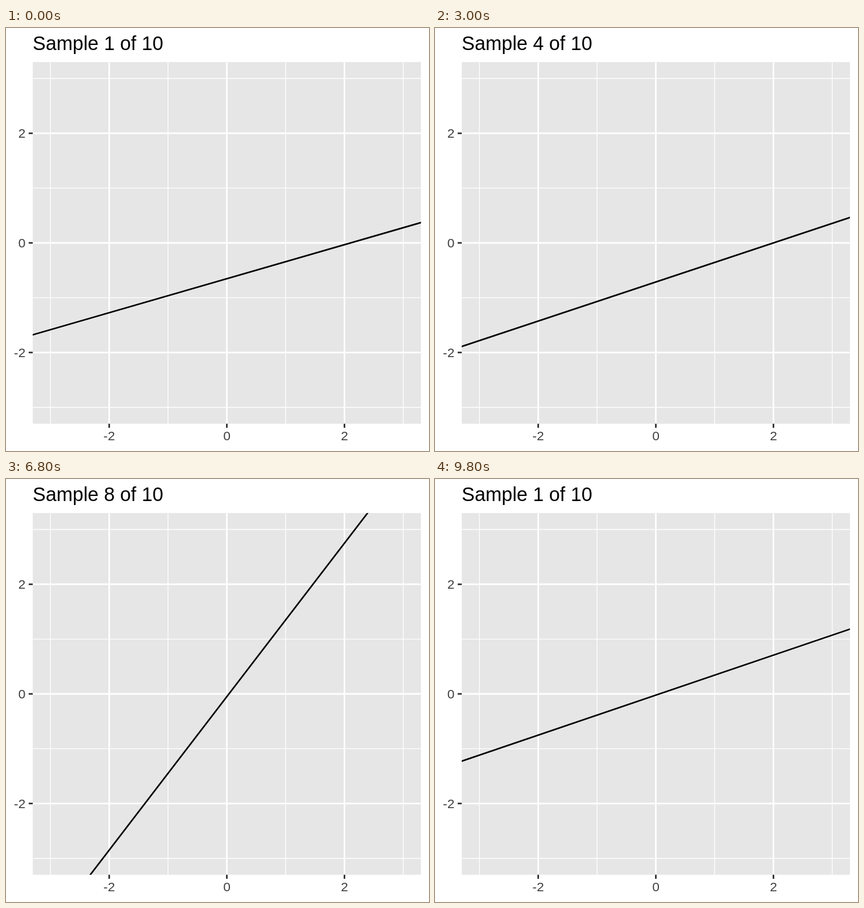
Recreate the animation shown at these times as an HTML page with a canvas. Size 748 by 748 pixels, loop 10 s.

```html
<!DOCTYPE html>
<html lang="en">
<head>
<meta charset="utf-8">
<title>Sampled lines</title>
<style>
  html, body { margin: 0; width: 100%; height: 100%; overflow: hidden; background: #fff; }
  canvas { display: block; width: 748px; height: 748px; }
</style>
</head>
<body>
<canvas id="plot" width="748" height="748"></canvas>
<script>
const ctx = document.getElementById('plot').getContext('2d');
const SIZE = 748, LIMIT = 3.3;
const PT = 2.6; // pixels per typographic point
const panel = { left: 47.3, top: 60.2, right: 733.7, bottom: 699.8 };
const STEP = 1000, TITLE_LEAD = 200;

// [intercept, slope] of each sample
const samples = [
  [-0.653, 0.3103], [-0.756, 1.427], [0.8, 0.642], [-0.713, 0.3567], [-1.966, -0.604],
  [-0.962, 0.590], [-0.05, 1.4], [-0.053, -1.172], [-1.5, -0.75], [-0.023, 0.365]
];

const px = x => panel.left + (x + LIMIT) / (2 * LIMIT) * (panel.right - panel.left);
const py = y => panel.bottom - (y + LIMIT) / (2 * LIMIT) * (panel.bottom - panel.top);

function segment(x1, y1, x2, y2, color, width) {
  ctx.strokeStyle = color;
  ctx.lineWidth = width;
  ctx.beginPath();
  ctx.moveTo(x1, y1);
  ctx.lineTo(x2, y2);
  ctx.stroke();
}

function label(text, x, y, size, color, align) {
  ctx.font = `${size * PT}px "Liberation Sans", Arial, sans-serif`;
  ctx.fillStyle = color;
  ctx.textAlign = align;
  ctx.fillText(text, x, y);
}

function grid(values, width) {
  for (const v of values) {
    segment(panel.left, py(v), panel.right, py(v), '#fff', width);
    segment(px(v), panel.top, px(v), panel.bottom, '#fff', width);
  }
}

function axes() {
  const tick = 2.75 * PT;
  for (const v of [-2, 0, 2]) {
    segment(panel.left - tick, py(v), panel.left, py(v), '#2b2b2b', 2.77);
    segment(px(v), panel.bottom, px(v), panel.bottom + tick, '#2b2b2b', 2.77);
    label(String(v), 34.4, py(v) + 8.2, 8.8, '#404040', 'right');
    label(String(v), px(v), 729.1, 8.8, '#404040', 'center');
  }
}

function draw(time) {
  const count = samples.length;
  const index = Math.floor(time / STEP) % count;
  const titleIndex = Math.floor((time + TITLE_LEAD) / STEP) % count;
  const [a, b] = samples[index];
  const w = panel.right - panel.left, h = panel.bottom - panel.top;

  ctx.fillStyle = '#fff';
  ctx.fillRect(0, 0, SIZE, SIZE);
  ctx.fillStyle = '#e6e6e6';
  ctx.fillRect(panel.left, panel.top, w, h);

  ctx.save();
  ctx.beginPath();
  ctx.rect(panel.left, panel.top, w, h);
  ctx.clip();
  grid([-3, -1, 1, 3], 1.39);
  grid([-2, 0, 2], 2.77);
  segment(px(-4), py(a - 4 * b), px(4), py(a + 4 * b), '#000', 2.77);
  ctx.restore();

  axes();
  label(`Sample ${titleIndex + 1} of ${count}`, panel.left, 39, 13.2, '#000', 'left');
}

const start = performance.now();
function tick() {
  draw(performance.now() - start);
  requestAnimationFrame(tick);
}
tick();
</script>
</body>
</html>
```
